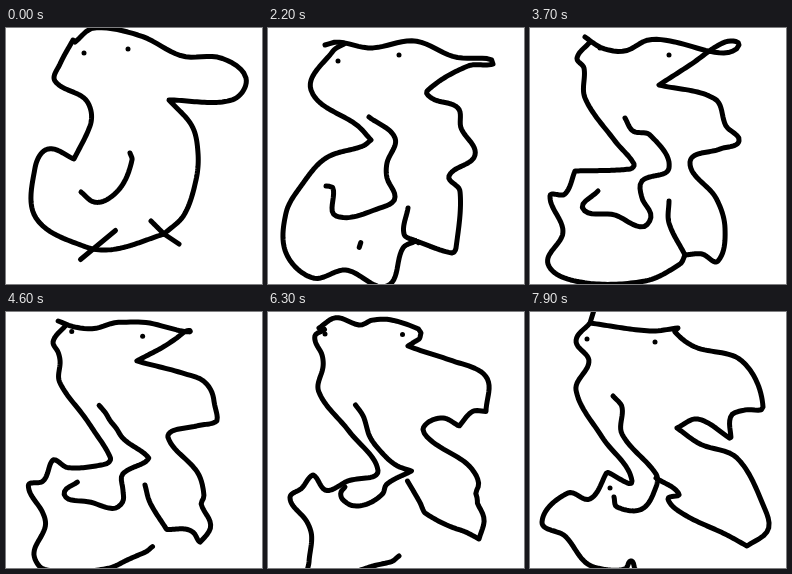
Animation, 256 px wide and 256 px high, one loop 8 s. Source, as an HTML page with a canvas:

```html
<!DOCTYPE html>
<html lang="en">
<head>
<meta charset="utf-8">
<title>Drifting doodle</title>
<style>
html, body { margin: 0; width: 100%; height: 100%; overflow: hidden; background: #fff; }
canvas { display: block; width: 256px; height: 256px; }
</style>
</head>
<body>
<canvas id="stage" width="256" height="256"></canvas>
<script>
const ctx = document.getElementById("stage").getContext("2d");
const LOOP = 8000, STEP = 100, SAMPLES = 36, FADE = 2300;

// Key points of the pen lines: "!" marks a sharp corner,
// "|" ends a section at a landmark that all poses share.
const poses = [
  {
    time: 0,
    back: "69,14 88,0 135,8 176,28 215,30 240,50|226,72 163,72!|186,98 192,125|190,152|178,187|158,206!|145,193",
    front: "158,206 110,221|80,219 30,190|29,140|42,121 68,131!|84,98 85,83|78,70 49,53|54,36 67,12",
    wing: "124,125 126,132|117,156 102,171|88,174 75,164",
    eyes: "78,25 122,21"
  },
  {
    time: 1300,
    back: "55,29 57,16 75,6 95,17 140,20 190,34 234,47|215,54 200,50 172,69!|195,94 206,127|183,151|189,174 184,188|175,206 163,213!|141,187 140,178",
    front: "163,213 132,231 123,256|105,247 80,224 40,212 32,205|39,185 34,152|43,135 58,123|82,117 91,102|80,85 43,60|50,38 55,29",
    wing: "111,103 121,120|114,142|118,165 95,181 72,161 64,159",
    eyes: "75,30 131,30"
  },
  {
    time: 2200,
    back: "57,17 70,14 103,20 147,13 187,29 222,31 225,36|200,38 159,63|165,71 190,80 193,100 207,127|181,148|192,163 188,220 184,225|148,213!|136,206 140,180",
    front: "148,213 135,220 119,258|78,242 45,250 18,225|18,185 33,158|58,130|95,118 103,112!|90,98 43,62|65,23 76,16",
    wing: "101,89 127,110|119,135 119,150|127,170 115,179 68,188 65,160 58,158",
    eyes: "70,33 131,27"
  },
  {
    time: 3700,
    back: "55,9 72,20 95,23 118,12 140,13 192,25 209,17|195,14 160,37 129,57!|185,71 196,98 209,113|190,121 160,134|186,170 195,200 188,233|172,226 155,227!|139,195 139,173",
    front: "155,227 150,236 115,253|50,254 18,236|33,204 20,168|35,166 45,143!|100,141 104,136|85,113 55,70|54,40 47,30 60,14",
    wing: "95,90 103,103 120,107 139,140|112,153|112,170 121,188 112,199 85,187 53,181 68,163",
    eyes: "70,20 139,27"
  },
  {
    time: 5600,
    back: "49,9 105,9 130,4 158,15 157,22|156,33 133,40!|180,56 220,70 213,104!|170,109 164,115|200,153 204,182 196,190 216,210 201,227!|197,210 167,207!|139,173",
    front: "137,243 108,250 88,260|39,264 39,250|48,222 42,205 25,180|40,172 50,153|60,170 98,165 105,157|82,110 52,70|54,50 47,30 60,12",
    wing: "91,97 102,107 108,142 147,153!|122,172|121,185 100,194 68,190 65,182 75,178",
    eyes: "61,19 134,21"
  },
  {
    time: 7000,
    back: "53,23 63,2 84,17 95,9 149,20!|143,24 147,28|213,55 223,95!|205,94 193,122! 172,104 146,120|160,136 212,154 220,178 214,186 221,227!|180,224 147,195|146,185 140,165",
    front: "125,245 121,254 88,258|43,264 43,250|36,215 19,191|40,173!|58,188 80,168 115,160|80,128 49,88|59,47 41,28 53,23",
    wing: "84,89 97,119 114,133 126,157 140,165!|115,173|88,194 79,172",
    eyes: "53,25 135,24"
  },
  {
    time: 7900,
    back: "64,-2 60,11! 120,19 148,16!|145,20|165,35 212,49 233,95|215,98 201,104 201,127! 168,107 147,116!|170,132 207,146 234,195 238,218 217,234!|195,222 155,203|138,187 149,182 126,166",
    front: "105,257 101,249 95,257|72,257 55,250|35,224 12,210|38,181|60,187 77,160! 102,169|72,125 46,78|59,49 46,29 60,11",
    wing: "83,84 92,95 92,122 126,162|126,175|112,197 87,195 84,185",
    eyes: "57,27 125,30"
  }
];

const mix = (a, b, k) => a + (b - a) * k;
const mixPoint = (p, q, k) => [mix(p[0], q[0], k), mix(p[1], q[1], k)];
const blend = (a, b, k) => a.map((p, i) => mixPoint(p, b[i], k));
const dist = (a, b) => Math.hypot(b[0] - a[0], b[1] - a[1]);

// A corner becomes a doubled point, which breaks the tangent there.
const parse = text => text.split(" ").flatMap(word => {
  const p = word.split(",").map(parseFloat);
  return word.endsWith("!") ? [p, p] : [p];
});

function direction(pts, i) {
  const a = pts[Math.max(0, i - 1)], b = pts[Math.min(pts.length - 1, i + 1)];
  const d = dist(a, b) || 1;
  return [(b[0] - a[0]) / d, (b[1] - a[1]) / d];
}

function hermite(pts, i, u) {
  const a = pts[i], b = pts[i + 1], len = dist(a, b), v = 1 - u;
  const da = direction(pts, i), db = direction(pts, i + 1);
  return [0, 1].map(c =>
    a[c] * v * v * (1 + 2 * u) + b[c] * u * u * (3 - 2 * u) +
    len * (da[c] * u * v * v - db[c] * u * u * v));
}

// Evenly spaced samples along a polyline
function resample(line) {
  const at = [0];
  for (let i = 1; i < line.length; i++) at.push(at[i - 1] + dist(line[i - 1], line[i]));
  const total = at[at.length - 1], out = [];
  let j = 0;
  for (let n = 0; n <= SAMPLES; n++) {
    const goal = total * n / SAMPLES;
    while (j < line.length - 2 && at[j + 1] < goal) j++;
    out.push(mixPoint(line[j], line[j + 1], (goal - at[j]) / (at[j + 1] - at[j] || 1)));
  }
  return out;
}

function trace(text) {
  const sections = text.split("|").map(parse), pts = sections.flat();
  let from = 0, end = -1;
  return sections.flatMap(section => {
    end += section.length;
    const line = [pts[from]];
    for (let i = from; i < end; i++) {
      for (let n = 1; n <= 12; n++) line.push(hermite(pts, i, n / 12));
    }
    from = end;
    return resample(line);
  });
}

const strokes = ["back", "front", "wing"];
for (const pose of poses) {
  for (const name of strokes) pose[name] = trace(pose[name]);
  pose.eyes = parse(pose.eyes);
}

function drawLine(pts) {
  ctx.beginPath();
  pts.forEach(p => ctx.lineTo(p[0], p[1]));
  ctx.stroke();
}

function drawDot([x, y]) {
  ctx.beginPath();
  ctx.arc(x, y, 2.5, 0, Math.PI * 2);
  ctx.fill();
}

// The left leg and the right toe shrink away early on.
function drawFeet(time, [x, y]) {
  const u = time / FADE;
  if (u >= 1) return;
  const size = 1 - u ** 4, dx = 17.5 * (1 - u), dy = 14.5 * size;
  drawLine([[92 + dx, 217 - dy], [92 - dx, 217 + dy]]);
  drawLine([[x, y], [x + 15 * size, y + 10 * size]]);
}

function draw(time) {
  let i = 0;
  while (i < poses.length - 2 && time >= poses[i + 1].time) i++;
  const a = poses[i], b = poses[i + 1];
  const k = (time - a.time) / (b.time - a.time);

  ctx.fillStyle = "#fff";
  ctx.fillRect(0, 0, 256, 256);
  ctx.fillStyle = ctx.strokeStyle = "#000";
  ctx.lineWidth = 5;
  ctx.lineCap = ctx.lineJoin = "round";
  for (const name of strokes) drawLine(blend(a[name], b[name], k));
  drawFeet(time, mixPoint(a.front[0], b.front[0], k));
  blend(a.eyes, b.eyes, k).forEach(drawDot);
  if (time >= 7500) drawDot([80, 176]);
}

const start = performance.now();
function tick() {
  const time = (performance.now() - start) % LOOP;
  draw(Math.floor(time / STEP) * STEP);
  requestAnimationFrame(tick);
}
tick();
</script>
</body>
</html>
```
